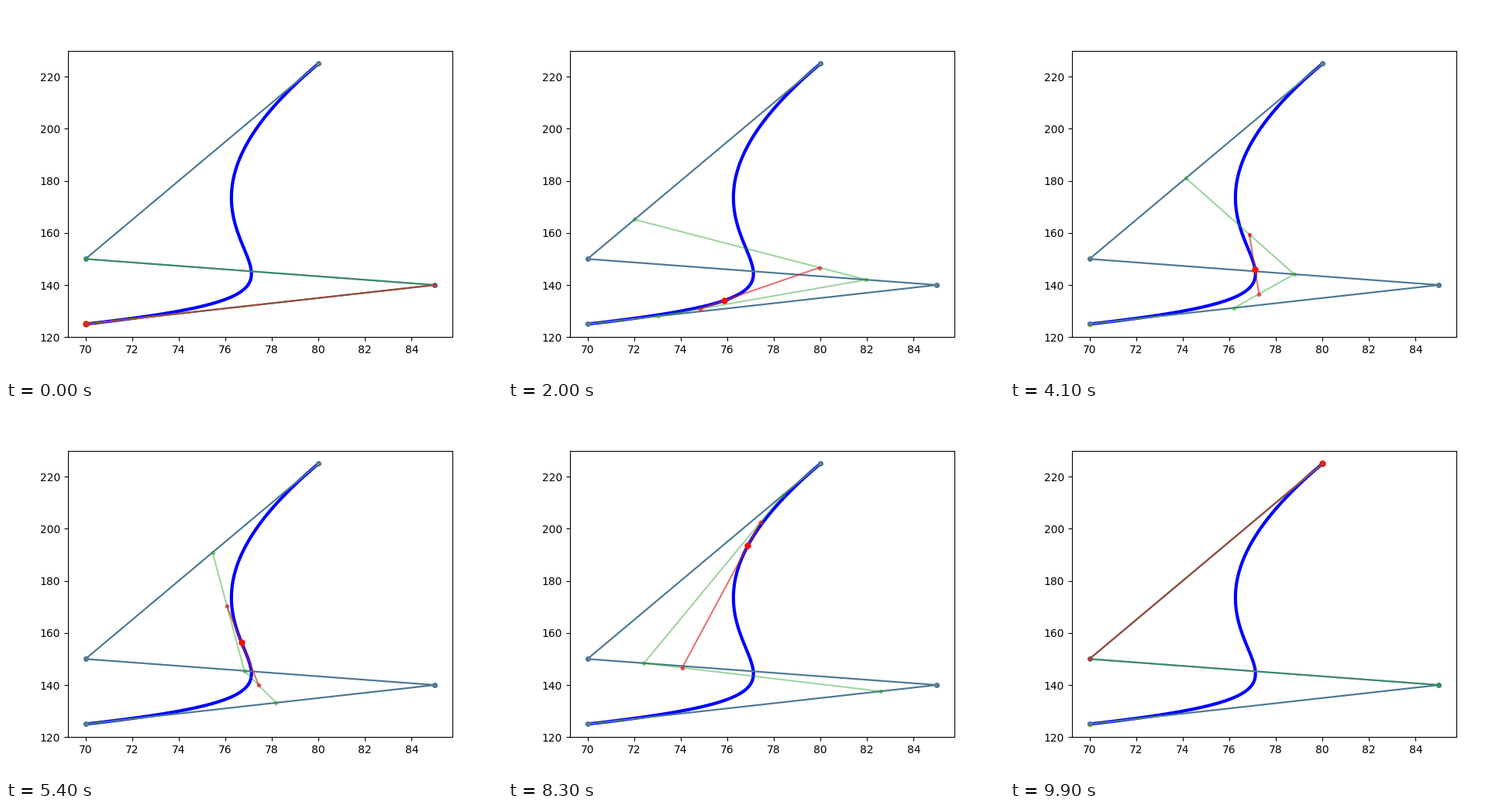
A matplotlib script for the animation above (10000 ms loop, 640 by 480 pixels).

```python
import numpy as np
import matplotlib.pyplot as plt
from matplotlib.animation import FuncAnimation

FRAMES = 100
INTERVAL = 100

control = np.array([(70, 125), (85, 140), (70, 150), (80, 225)], float)
times = np.linspace(0, 1, FRAMES)


def casteljau(points, t):
    """Return every level of the construction, from control points to curve point."""
    levels = [points]
    while len(levels[-1]) > 1:
        p = levels[-1]
        levels.append((1 - t) * p[:-1] + t * p[1:])
    return levels


curve = np.array([casteljau(control, t)[-1][0] for t in times])

fig, ax = plt.subplots(figsize=(6.4, 4.8), dpi=100)
ax.plot(*curve.T, "b", lw=3)
ax.plot(*control.T, "o-", color="tab:blue", ms=4)
dot, = ax.plot(*curve[:1].T, "ro", ms=5)

styles = [("tab:orange", 0.2), ("tab:green", 0.45), ("tab:red", 0.65)]
lines = [
    ax.plot(*level.T, ".-", color=color, alpha=alpha)[0]
    for level, (color, alpha) in zip(casteljau(control, 0), styles)
]


def update(i):
    levels = casteljau(control, times[i])
    for line, level in zip(lines, levels):
        line.set_data(*level.T)
    dot.set_data(*levels[-1].T)
    return [*lines, dot]


anim = FuncAnimation(fig, update, frames=FRAMES, interval=INTERVAL, repeat=True)
plt.show()
```
